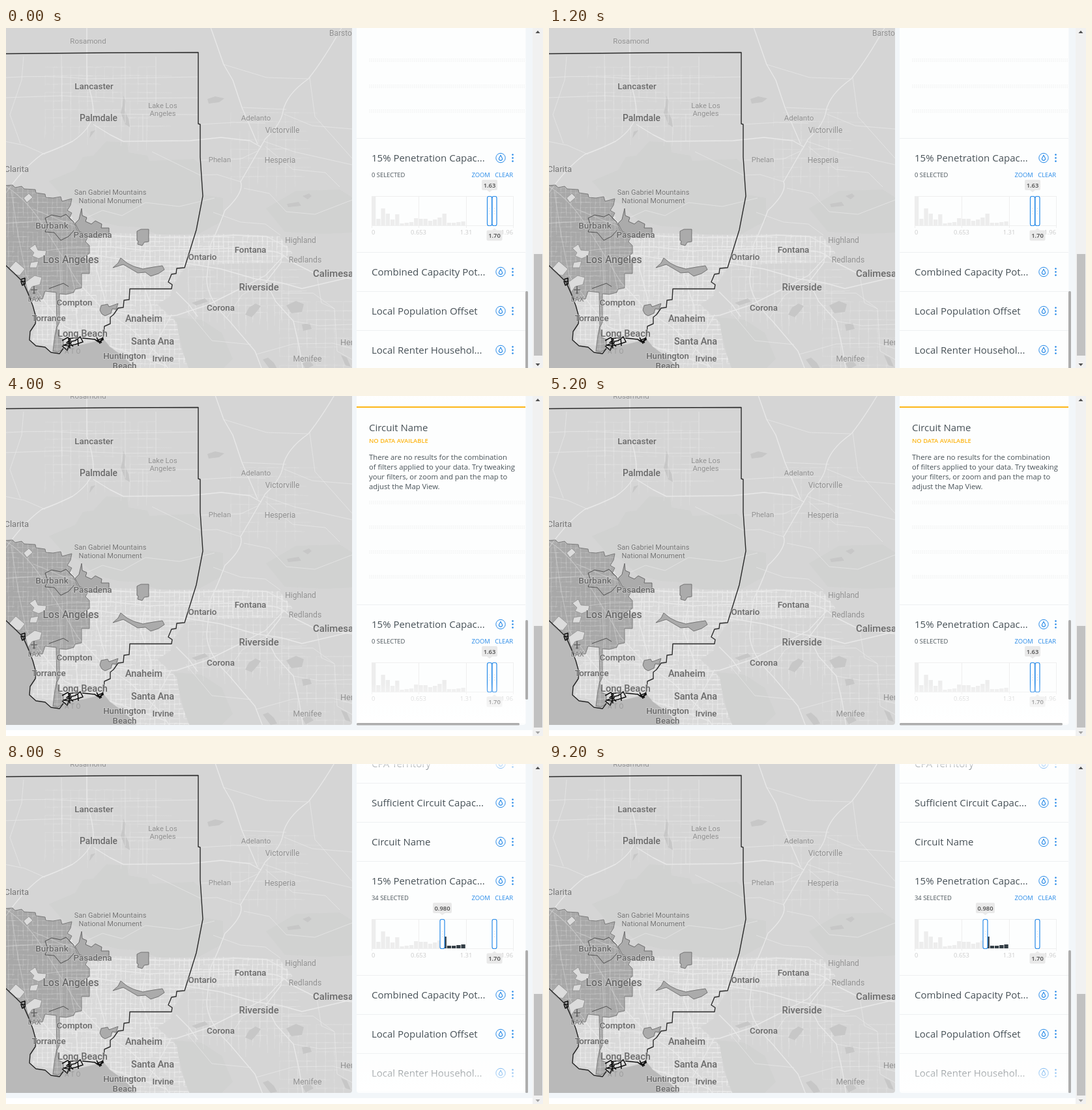
Write an HTML page with a canvas that moves like this. It is 824 px wide and 522 px high and loops after 10000 ms.

```html
<!DOCTYPE html>
<html lang="en">
<head>
<meta charset="utf-8">
<title>Map dashboard</title>
<style>
html, body { margin: 0; width: 100%; height: 100%; overflow: hidden; background: #fff; }
canvas { display: block; }
</style>
</head>
<body>
<canvas id="stage" width="824" height="522"></canvas>
<script>
const ctx = document.getElementById('stage').getContext('2d');
const BLUE = '#2589e8', INK = '#475157', YELLOW = '#fdb515';
const SANS = '"Open Sans", sans-serif', MAP_FONT = 'Roboto, sans-serif';
const MAP_TOP = 24;

function rng(seed) {
  return () => {
    seed = (seed * 1664525 + 1013904223) >>> 0;
    return seed / 4294967296;
  };
}

function text(c, str, x, y, font, color, align = 'left') {
  c.font = font;
  c.fillStyle = color;
  c.textAlign = align;
  c.textBaseline = 'alphabetic';
  c.fillText(str, x, y);
}

function shape(c, d, fill, stroke, width = 1) {
  const p = new Path2D(d);
  if (fill) { c.fillStyle = fill; c.fill(p); }
  if (stroke) { c.strokeStyle = stroke; c.lineWidth = width; c.stroke(p); }
}

function box(c, x, y, w, h, r, fill, stroke, width) {
  c.beginPath();
  c.roundRect(x, y, w, h, r);
  if (fill) { c.fillStyle = fill; c.fill(); }
  if (stroke) { c.strokeStyle = stroke; c.lineWidth = width; c.stroke(); }
}

// ---------- map ----------
const URBAN = 'M-2 222L60 236L100 262L104 284L135 294L200 296L275 298L350 296L420 300L440 326L410 340L340 342L276 346L258 372L252 392L232 404L262 432L268 470L282 507L200 507L150 458L85 470L40 462L46 430L28 372L-2 342Z';
const OCEAN = 'M-2 343L12 356L26 370L34 388L41 406L46 424L45 434L37 446L36 459L46 468L60 470L69 478L82 480L90 470L118 466L150 458L160 470L174 480L190 494L203 508L-2 508Z';
const CITY = 'M-2 222L10 221L14 225L24 223L28 227L45 228L46 233L60 235L61 240L72 241L84 239L86 246L101 242L99 252L94 260L101 264L97 272L104 278L110 292L118 298L126 300L122 308L128 314L128 326L118 332L128 338L128 357L116 357L116 379L106 381L104 386L92 389L82 388L82 432L78 440L80 455L88 458L88 472L80 478L72 476L75 452L78 437L77 386L60 384L56 396L38 396L34 386L26 370L12 356L-2 343Z';
const HOLES = 'M27 241L35 234L41 240L32 248Z M36 318L45 312L49 321L62 322L60 330L50 334L40 330L43 325Z M4 350L15 338L29 350L21 360L12 358Z M30 370L44 360L55 363L52 374L40 377L34 386Z M38 340L50 338L47 348L36 348Z';
const COUNTY = 'M-2 19.5L160 18L295 17.5L295 127L298 128L298 178L302 238L292 290L274 348L262 349L261 357L254 358L249 370L255 374L254 380.5L190 380.5L189 397L181 398L180 409L172 410L165 420L160 424L160 434L151 438L150 452L145 461';
const COAST = 'M-2 343L12 356L26 370L34 388L41 406L46 424L45 434L37 446L36 459L46 468L60 470L69 478L82 480L88 472';
const BORDERS = 'M60 272L70 267L84 270L92 266L104 278 M60 272L64 283L60 293L74 294L84 306L96 300L104 291 M66 380L88 372L96 377';
const FOOTHILLS = 'M116 257L117 268L124 271L122 277L131 281L137 276L147 281L146 287L158 287L158 297L143 297L142 302L126 300L112 292L106 280L112 274Z';
const ISLANDS = 'M201 292L207 289L219 289L219 308L212 309L209 314L202 312L203 307L201 306Z M146 406L156 404L158 408L172 403L169 412L163 411L161 418L152 422L147 419L144 413Z M176 333L186 341L196 346L210 350L226 347L240 345L243 351L234 357L222 361L214 355L202 356L192 350L180 343L164 348L172 341Z';
const HARBOR = 'M86 460L95 455L99 459L93 463L106 460L114 454L118 462L106 466L96 468L88 467L101 463 M98 472L96 457L110 455L111 468 M86 468L94 475L98 464L103 469 M117 456L136 458L142 462L150 458 M139 455L144 464L149 456L139 460L147 463 M23 366L29 364L29 373L25 375L23 369L30 369';
const MOUNTAINS = 'M66 215L106 198L118 178L134 176L154 154L186 156L188 171L217 176L220 184L288 181L299 190L304 236L333 241L333 276L296 296L235 298L205 286L172 284L137 275L112 252L88 240Z M399 257L445 230L512 228L531 240L531 294L489 296L428 293Z M258 424L300 428L331 448L348 488L329 507L280 507Z';
const LAKES = 'M309 89l12 -4 14 3 -8 6 -16 2z M455 238l10 -4 4 4 -6 5z M431 250l18 -3 4 6 -20 2z M367 420l6 -11 10 -6 8 4 -6 8 -8 9z M394 489l8 -3 9 8 5 9 -10 2z M454 435l12 -2 3 9 -13 3z M514 482l9 4 6 14 -8 -2z M455 495l10 -5 7 8 -12 6z M180 84l4 8 -2 14 6 14 2 12 -7 -4 -7 -18 3 -11z M137 137l-9 12 2 -10z M285 402l20 -7 5 5 -18 6z M430 406l15 -7 12 5 -3 12 -16 2z';
const FREEWAYS = [
  'M124 -24L124 62Q134 88 134 112Q130 135 102 154Q78 166 55 174Q25 196 -2 236',
  'M134 128L160 144L180 154L282 153L330 148L374 153L392 163',
  'M517 -24Q488 28 464 58Q430 82 425 108Q422 128 398 150L360 216Q366 232 336 260Q325 290 314 312L308 365Q308 396 343 430L382 476L394 507',
  'M313 -24L334 36L348 60L362 102L386 158',
  'M44 324L90 318L160 316L220 322L280 320L340 318L400 322Q422 322 436 338L478 359L531 365',
  'M42 258L100 282L140 297L200 301L280 302L350 298L400 300L430 316',
  'M92 328L140 329L200 339L270 340L330 350L382 365L422 371L454 380L531 362',
  'M52 410L130 410L172 416L222 425L262 421L310 405L350 385L398 360L426 330',
  'M-2 222Q34 244 60 288L86 330L110 370L152 415L190 440L232 480L252 507',
  'M8 230L19 300L31 360L61 402L90 438L152 466L202 483L246 499',
  'M424 310L422 340L399 370L414 400L441 430L450 470L456 507',
  'M82 324L84 375L81 420L86 466', 'M94 328L105 380L108 420L112 460',
  'M143 306L139 350L151 394L153 444', 'M214 320L207 362L223 408L224 450',
  'M254 420L240 446L220 482', 'M261 385L281 405L294 423', 'M-2 280L60 276L106 277'
];
const RURAL = [
  'M0 56Q63 52 124 58L295 55', 'M-2 87L85 84L180 88L295 87', 'M134 112L295 113',
  'M183 17L183 126', 'M85 21L86 126', 'M230 24L230 98', 'M210 112L210 154',
  'M298 183L360 181L388 168', 'M360 216L324 205L298 206L224 170',
  'M396 154L442 170L531 190', 'M398 162L440 197L490 202L512 224',
  'M318 263L360 278L398 281L421 298', 'M365 226L404 234L430 262L474 266L531 244',
  'M104 280L148 260L178 268L214 248L266 254L320 241',
  'M362 102L430 105', 'M426 112L470 130L531 135', 'M334 36L400 56L463 58',
  'M-2 154L28 160L60 174', 'M27 24L24 60L6 113L22 157',
  'M424 387L471 387L504 411L508 476L531 489', 'M441 430L481 437L531 435',
  'M384 481L441 465L502 464L531 472', 'M276 412L316 460L376 466', 'M477 360L484 402L504 411',
  'M403 366L362 390L338 426', 'M298 128L350 125L398 126', 'M466 56L474 116L531 180'
];

const MAJOR = [
  ['Lancaster', 135, 74, 13.4], ['Palmdale', 142, 123, 13.8], ['Burbank', 70.5, 288, 13.6],
  ['Pasadena', 133, 302, 13.3], ['Los Angeles', 99.5, 341, 15.7], ['Compton', 105, 406, 13.4],
  ['Torrance', 65.5, 430, 13.3], ['Long Beach', 117.5, 454, 14.6], ['Anaheim', 211.5, 431, 14.4],
  ['Santa Ana', 225, 466, 14.5], ['Huntington', 182, 488, 13.2], ['Beach', 182, 503, 13.2],
  ['Irvine', 241, 492, 13.2], ['Ontario', 301.5, 336, 13.3], ['Fontana', 375, 325, 13.4],
  ['Riverside', 388, 383, 14.8], ['Corona', 329.5, 414, 13.3], ['Calimesa', 502, 362, 14.9]
];
const MINOR = [
  ['Rosamond', 126, 4, 11.5], ['Barstow', 518, -8, 12], ['Lake Los', 240.5, 103, 11.2],
  ['Angeles', 240.5, 115, 11.2], ['Adelanto', 383.5, 122, 11.5], ['Victorville', 424, 141, 12],
  ['Phelan', 328, 186, 11.3], ['Hesperia', 420.5, 187, 12], ['Highland', 452, 310, 12],
  ['Redlands', 459, 340, 12.2], ['Menifee', 462.5, 492, 12.2], ['Hemet', 532, 467, 12.8]
];
const PARKS = [
  ['San Gabriel Mountains', 160, 236, 11], ['National Monument', 160, 249, 11],
  ['Santa Clarita', -2, 201, 13], ['LAX', 43.5, 400, 11]
];

function labels(c, list, weight, color) {
  c.lineJoin = 'round';
  for (const [str, x, y, size] of list) {
    c.font = `${weight} ${size}px ${MAP_FONT}`;
    c.textAlign = 'center';
    c.strokeStyle = 'rgba(218,218,218,.55)';
    c.lineWidth = 2;
    c.strokeText(str, x, y);
    text(c, str, x, y, c.font, color, 'center');
  }
}

function streets(c, x0, y0, x1, y1, step, alpha, seed) {
  const rnd = rng(seed);
  c.strokeStyle = `rgba(244,244,244,${alpha})`;
  c.beginPath();
  for (let y = y0; y < y1; y += step) {
    for (let x = x0; x < x1; x += step) {
      const len = step * (1 + rnd() * 2), bend = (rnd() - .5) * 2;
      if (rnd() < .72) { c.moveTo(x, y); c.lineTo(x + len, y + bend); }
      if (rnd() < .72) { c.moveTo(x, y); c.lineTo(x + bend, y + len); }
    }
  }
  c.lineWidth = .7;
  c.stroke();
}

function clipped(c, d, draw) {
  c.save();
  c.clip(new Path2D(d));
  draw();
  c.restore();
}

function buildMap() {
  const cv = document.createElement('canvas');
  cv.width = 531;
  cv.height = 534;
  const c = cv.getContext('2d');
  c.translate(0, MAP_TOP);
  c.lineJoin = 'round';
  c.fillStyle = '#d5d5d5';
  c.fillRect(0, -MAP_TOP, 531, 534);
  shape(c, MOUNTAINS, '#d1d2d1');
  shape(c, URBAN, '#d9d9d9');
  streets(c, 60, 40, 225, 132, 13, .25, 4);
  streets(c, 345, 110, 455, 215, 14, .2, 9);
  streets(c, 280, 340, 440, 425, 11, .3, 13);
  streets(c, 420, 400, 531, 505, 14, .2, 21);
  shape(c, LAKES, '#c7c7c7');
  RURAL.forEach(d => shape(c, d, null, 'rgba(238,238,238,.6)', .9));
  clipped(c, URBAN, () => streets(c, -4, 218, 445, 508, 7.5, .6, 31));
  FREEWAYS.forEach(d => shape(c, d, null, '#e8e8e8', 1.4));
  shape(c, OCEAN, '#b9b9b9');

  shape(c, FOOTHILLS, '#ababab', '#555', .8);
  shape(c, CITY, '#a8a8a8');
  clipped(c, CITY, () => {
    streets(c, -4, 218, 130, 480, 7.5, .2, 57);
    FREEWAYS.forEach(d => shape(c, d, null, 'rgba(215,215,215,.55)', 1.1));
  });
  shape(c, CITY, null, '#6a6a6a', .8);
  shape(c, HOLES, '#dcdcdc', '#888', .7);
  shape(c, ISLANDS, '#ababab', '#606060', .8);
  shape(c, BORDERS, null, '#444', .9);
  shape(c, COUNTY, null, '#2b2b2b', 1.4);
  shape(c, COAST, null, '#222', 1.4);
  shape(c, HARBOR, null, '#111', 1.6);
  text(c, 'A T O', 90, 480, '10px ' + MAP_FONT, 'rgba(130,130,130,.55)');

  // airport symbol
  shape(c, 'M43 376V388M38 382H48M41 387H45', null, '#666', 1.7);
  labels(c, PARKS, 400, '#757575');
  labels(c, MINOR, 400, '#909090');
  labels(c, MAJOR, 500, '#696969');
  return cv;
}

// ---------- panel ----------
const BARS = [44, 10, 26, 18, 9, 17, 3, 4, 5, 11, 10, 10, 7, 9, 12, 18, 4, 4, 5, 6];
const HIST_X = 561, BIN = 217 / 30;
const MESSAGE = [
  'There are no results for the combination',
  'of filters applied to your data. Try tweaking',
  'your filters, or zoom and pan the map to',
  'adjust the Map View.'
];

function rule(y, color = '#eef0f2', h = 1) {
  ctx.fillStyle = color;
  ctx.fillRect(538, y, 259, h);
}

function skeleton(y) {
  ctx.strokeStyle = '#f3f4f4';
  ctx.lineWidth = 1;
  ctx.setLineDash([2, 1]);
  for (let i = -2; i <= 2; i += 2) {
    ctx.beginPath();
    ctx.moveTo(557, y + i + .5);
    ctx.lineTo(797, y + i + .5);
    ctx.stroke();
  }
  ctx.setLineDash([]);
}

function emptyCard(y, title) {
  rule(y - 2, YELLOW, 2);
  text(ctx, title, 557, y + 36, '15px ' + SANS, INK);
  text(ctx, 'NO DATA AVAILABLE', 557, y + 54, '600 9.4px ' + SANS, YELLOW);
  MESSAGE.forEach((line, i) => text(ctx, line, 557, y + 80 + 15 * i, '11.25px ' + SANS, INK));
  for (let i = 0; i < 4; i++) skeleton(Math.floor(y + 145 + 38.3 * i));
}

function titleRow(y, title) {
  text(ctx, title, 561, y + 5, '15px ' + SANS, INK);
  ctx.beginPath();
  ctx.arc(759, y - .5, 7.2, 0, 7);
  ctx.strokeStyle = BLUE;
  ctx.lineWidth = 1;
  ctx.stroke();
  ctx.save();
  ctx.translate(759, y - .5);
  shape(ctx, 'M0 -4C1 -2 2.6 -.4 2.6 1.2A2.6 2.6 0 0 1 -2.6 1.2C-2.6 -.4 -1 -2 0 -4Z', null, BLUE, 1.2);
  ctx.restore();
  ctx.fillStyle = BLUE;
  for (const d of [-5, 0, 5]) {
    ctx.beginPath();
    ctx.arc(777.5, y - .5 + d, 1.3, 0, 7);
    ctx.fill();
  }
}

function row(top, title) {
  rule(top);
  titleRow(top + 31, title);
}

function tip(x, y, value, dir) {
  const w = value.length > 4 ? 29 : 24;
  box(ctx, x - w / 2, y - 8, w, 16, 2, '#e9e9e9');
  ctx.beginPath();
  ctx.moveTo(x - 4, y + 8 * dir);
  ctx.lineTo(x + 4, y + 8 * dir);
  ctx.lineTo(x, y + 11 * dir);
  ctx.fill();
  text(ctx, value, x, y + 3.5, '600 9.4px ' + SANS, '#4c4c4c', 'center');
}

function handle(x, y) {
  box(ctx, x - 3.5, y + .5, 7, 45, 2.5, '#fff', BLUE, 1.2);
  ctx.fillStyle = '#d8dde0';
  for (const d of [-4, 0, 4]) ctx.fillRect(x - .5, y + 22.5 + d, 1, 1.2);
}

function histogram(top, count, low, lowX) {
  const y = top + 89, base = y + 45;
  row(top, '15% Penetration Capac...');
  text(ctx, count + ' SELECTED', 561, top + 60, '9.4px ' + SANS, INK);
  text(ctx, 'ZOOM', 714.5, top + 60, '9.4px ' + SANS, BLUE);
  text(ctx, 'CLEAR', 778, top + 60, '9.4px ' + SANS, BLUE, 'right');

  ctx.fillStyle = '#efefef';
  ctx.fillRect(HIST_X, y, 217, 1);
  ctx.fillRect(HIST_X, base, 217, 1);
  for (let i = 0; i < 4; i++) ctx.fillRect(HIST_X + Math.round(72.3 * i), y, 1, 49);
  BARS.forEach((h, i) => {
    const x = HIST_X + BIN * i;
    ctx.fillStyle = x + BIN > lowX + 2 ? '#333d45' : '#ededed';
    ctx.fillRect(x, base - h, 6.3, h);
  });

  const axis = '9.4px ' + SANS, grey = '#cbcbcb', ay = top + 148;
  text(ctx, '0', 561, ay, axis, grey);
  text(ctx, '0.653', 633, ay, axis, grey, 'center');
  text(ctx, '1.31', 706, ay, axis, grey, 'center');
  text(ctx, '1.96', 778, ay, axis, grey, 'right');
  handle(lowX, y);
  handle(749.5, y);
  tip(lowX, top + 72, low, 1);
  tip(749.5, top + 149.5, '1.70', -1);
}

function fade(y0, y1, a0, a1) {
  const g = ctx.createLinearGradient(0, y0, 0, y1);
  g.addColorStop(0, `rgba(255,255,255,${a0})`);
  g.addColorStop(1, `rgba(255,255,255,${a1})`);
  ctx.fillStyle = g;
  ctx.fillRect(538, y0, 259, y1 - y0);
}

const SCENES = [
  {
    dy: 20, thumb: [404, 121],
    draw() {
      [49, 89, 127].forEach(skeleton);
      histogram(169, 0, '1.63', 742);
      row(344, 'Combined Capacity Pot...');
      row(404, 'Local Population Offset');
      row(464, 'Local Renter Househol...');
    }
  },
  {
    dy: 0, thumb: [275, 122], wide: true,
    draw() {
      emptyCard(10, 'Sufficient Circuit Capacity');
      emptyCard(314, 'Circuit Name');
    }
  },
  {
    dy: 0, thumb: [344, 122], wide: true,
    draw() {
      emptyCard(18, 'Circuit Name');
      histogram(320, 0, '1.63', 742);
    }
  },
  {
    dy: 0, thumb: [344, 122], wide: true,
    draw() {
      emptyCard(18, 'Circuit Name');
      histogram(320, 0, '1.05', 679);
    }
  },
  {
    dy: 0, thumb: [286, 219],
    draw() {
      titleRow(0, 'CPA Territory');
      row(29, 'Sufficient Circuit Capac...');
      row(89, 'Circuit Name');
      histogram(149, 34, '0.980', 669.5);
      row(324, 'Combined Capacity Pot...');
      row(384, 'Local Population Offset');
      row(444, 'Local Renter Househol...');
    }
  }
];

function arrow(y, dir, color) {
  ctx.fillStyle = color;
  ctx.beginPath();
  ctx.moveTo(812.5, y);
  ctx.lineTo(819.5, y);
  ctx.lineTo(816, y - 4 * dir);
  ctx.fill();
}

const map = buildMap();

function render(scene) {
  const { dy } = scene, bottom = 505 + dy;
  ctx.fillStyle = '#fff';
  ctx.fillRect(0, 0, 824, 522);
  ctx.fillStyle = '#f2f6f9';
  ctx.fillRect(0, 0, 808, 513 + dy);

  ctx.save();
  ctx.beginPath();
  ctx.roundRect(0, -10, 531, bottom + 10, [0, 0, 4, 0]);
  ctx.clip();
  ctx.drawImage(map, 0, dy - MAP_TOP);
  ctx.restore();

  ctx.save();
  ctx.beginPath();
  ctx.roundRect(538, -10, 259.5, bottom + 10, [0, 0, 4, 4]);
  ctx.clip();
  ctx.fillStyle = '#fdfefe';
  ctx.fillRect(538, 0, 260, 522);
  scene.draw();
  if (!dy) {
    fade(0, 16, .8, 0);
    fade(440, 502, 0, .95);
  }
  ctx.restore();

  if (scene.wide) box(ctx, 538, 502, 250, 3.5, 1.5, '#adadad');
  box(ctx, 797, scene.thumb[0], 4, scene.thumb[1], 1.5, '#adadad');

  ctx.fillStyle = '#f1f1f1';
  ctx.fillRect(808, 0, 16, 522);
  ctx.fillStyle = '#c1c1c1';
  ctx.fillRect(810, dy ? 347 : 353, 13, 156);
  arrow(8, 1, '#505050');
  arrow(515, -1, dy ? '#505050' : '#a3a3a3');
}

const start = performance.now();
function tick() {
  const t = (performance.now() - start) % 10000;
  render(SCENES[Math.floor(t / 2000)]);
  requestAnimationFrame(tick);
}
tick();
</script>
</body>
</html>
```
